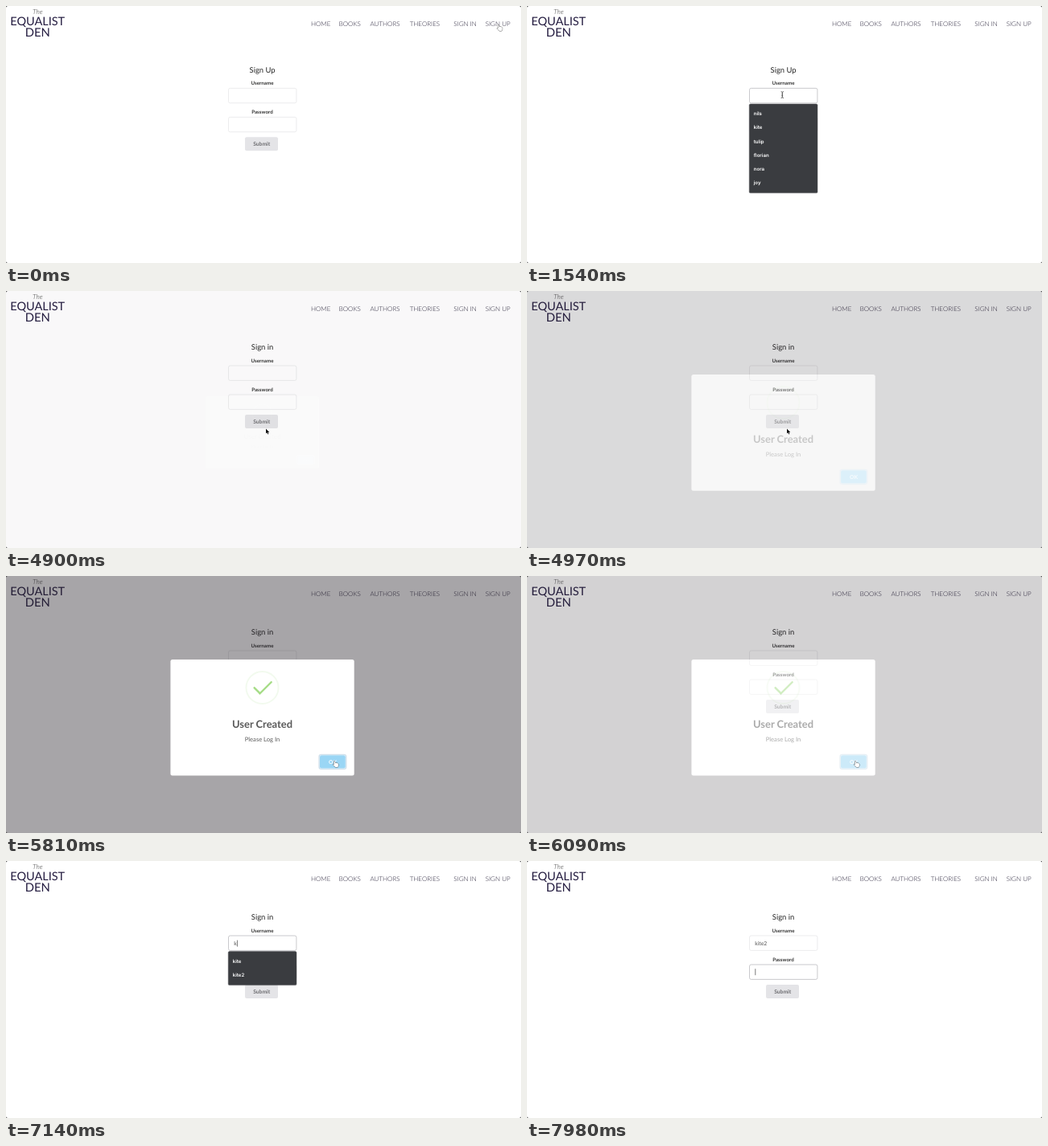
Recreate the animation shown at these times as an HTML page with a canvas. Size 640 px wide and 320 px high, loop 8000 ms.

```html
<!DOCTYPE html>
<html lang="en">
<head>
<meta charset="utf-8">
<title>Sign up demo</title>
<style>
  html, body { margin: 0; width: 100%; height: 100%; overflow: hidden; background: #fff; }
  canvas { display: block; width: 640px; height: 320px; }
</style>
</head>
<body>
<canvas id="stage"></canvas>
<script>
const W = 640, H = 320, LOOP = 8000, STEP = 70;
const ratio = window.devicePixelRatio || 1;

function prepare(canvas) {
  canvas.width = W * ratio;
  canvas.height = H * ratio;
  const c = canvas.getContext('2d');
  c.scale(ratio, ratio);
  c.textRendering = 'geometricPrecision';
  return c;
}
const screen = prepare(document.getElementById('stage'));
const layerCanvas = document.createElement('canvas');
const layer = prepare(layerCanvas);

// Value of the last entry whose time has come.
function at(t, keys) {
  let value = keys[0][1];
  for (const [time, v] of keys) if (t >= time) value = v;
  return value;
}

// Eased values between [time, ...values] keys.
function track(t, keys) {
  if (t <= keys[0][0]) return keys[0].slice(1);
  for (let i = 1; i < keys.length; i++) {
    const a = keys[i - 1], b = keys[i];
    if (t > b[0]) continue;
    const p = (t - a[0]) / (b[0] - a[0]), e = p * p * (3 - 2 * p);
    return a.slice(1).map((v, k) => v + (b[k + 1] - v) * e);
  }
  return keys[keys.length - 1].slice(1);
}

function text(c, str, x, y, font, color, align = 'left') {
  c.font = font + ', sans-serif';
  c.fillStyle = color;
  c.textAlign = align;
  c.fillText(str, x, y);
}

function box(c, x, y, w, h, r, fill, stroke, width = 0.7) {
  c.beginPath();
  c.roundRect(x, y, w, h, r);
  if (fill) { c.fillStyle = fill; c.fill(); }
  if (stroke) { c.strokeStyle = stroke; c.lineWidth = width; c.stroke(); }
}

// ---- page ----
const MID = 318.5;
const NAV = [['HOME', 379], ['BOOKS', 413.7], ['AUTHORS', 452.5], ['THEORIES', 501.7],
  ['SIGN IN', 556.3], ['SIGN UP', 595.7]];
const MENU = ['nils', 'kite', 'tulip', 'florian', 'nora', 'joy'];
const MATCHES = ['kite', 'kite2'];

const USER = [[0, ''], [1680, 'k'], [1820, 'ki'], [1890, 'kit'], [1960, 'kite'], [2240, 'kite2'],
  [4900, ''], [7140, 'k'], [7280, 'ki'], [7420, 'kit'], [7560, 'kite'], [7700, 'kite2']];
const DOTS = [[0, 0], [3010, 1], [3290, 2], [3360, 3], [3500, 4], [3850, 5], [4900, 0]];
const FOCUS = [[0, ''], [1260, 'user'], [2800, 'pass'], [4550, ''], [6860, 'user'], [7910, 'pass']];
const CARET = [[0, true], [1540, false], [1680, true], [2590, false], [2800, true]];
const ROWS = [[0, 0], [1260, 6], [1680, 1], [1960, 0], [6860, 6], [7140, 2], [7700, 0]];

function drawHeader(c) {
  text(c, 'The', 39.3, 10.3, 'italic 300 8.3px Lato', '#333', 'center');
  text(c, 'EQUALIST', 39.2, 23.7, '400 14.5px Lato', '#241c40', 'center');
  text(c, 'DEN', 39.2, 37.8, '400 14.8px Lato', '#241c40', 'center');
  for (const [label, x] of NAV) text(c, label, x, 25, '300 8px Lato', '#221c34');
}

function drawCaret(c, x, y) {
  c.fillStyle = '#444';
  c.fillRect(x, y - 4, 0.7, 8);
}

function drawField(c, y, focused) {
  box(c, 276.5, y, 84.4, 18.4, 2, '#fff', focused ? '#b4b4b8' : '#e4e4e6');
}

function drawMenu(c, rows) {
  const names = rows === MENU.length ? MENU : MATCHES.slice(0, rows);
  box(c, 276.2, 122, 84.8, rows * 17.2 + 7.6, 1.5, '#3a3c40', '#55575b', 0.5);
  names.forEach((name, i) => text(c, name, 281.7, 136.2 + i * 17.2, '600 6.1px Inter', '#fff'));
}

function drawForm(c, t) {
  const signIn = t >= 4900, focus = at(t, FOCUS), blink = at(t, CARET);
  const user = at(t, USER), dots = at(t, DOTS), rows = at(t, ROWS);
  const hover = t >= 4340 && t < 4900;
  c.save();
  if (signIn) c.translate(0, -9.4);
  text(c, signIn ? 'Sign in' : 'Sign Up', MID, 82.5, '400 9.4px Lato', '#222', 'center');
  text(c, 'Username', MID, 98.2, '700 6.2px Lato', '#333', 'center');
  text(c, 'Password', MID, 134, '700 6.2px Lato', '#333', 'center');

  drawField(c, 102.4, focus === 'user');
  text(c, user, 283.2, 114.3, '400 6.8px Lato', '#505050');
  if (focus === 'user' && blink) drawCaret(c, 283.5 + c.measureText(user).width, 112);

  drawField(c, 138.4, focus === 'pass');
  c.fillStyle = '#222';
  for (let i = 0; i < dots; i++) {
    c.beginPath();
    c.arc(285.2 + i * 3.9, 148, 1.45, 0, 7);
    c.fill();
  }
  if (focus === 'pass') drawCaret(c, 283.5 + dots * 3.9, 147.6);

  box(c, 297, 163.3, 41, 17, 2, hover ? '#cfcfd2' : '#e4e4e7');
  text(c, 'Submit', 317.7, 174, '700 6.7px Lato', '#6c6c70', 'center');
  if (rows) drawMenu(c, rows);
  c.restore();
}

// ---- alert ----
const UNIT = 0.477;
const POP = 4860;
const FADE = [[POP, 0], [5110, 1], [6020, 1], [6160, 0]];
const SCALE = [[0, 0.5], [135, 1.05], [240, 0.95], [300, 1]];
// width, centre x, centre y of both strokes of the tick, in an 80 unit icon
const TIP = [[405, 0, 1, 21.5], [525, 50, 17, 39.5], [630, 17, 29.5, 50.5], [750, 25, 26.5, 47.5]];
const LONG = [[488, 0, 34, 56.5], [630, 55, 52.5, 37.5], [750, 47, 48.5, 40.5]];

function drawStroke(c, [w, x, y], angle) {
  if (w <= 0) return;
  c.save();
  c.translate(x - 40, y - 40);
  c.rotate(angle);
  box(c, -w / 2, -2.5, w, 5, 2, '#a5dc86');
  c.restore();
}

function drawTick(c, age) {
  c.save();
  c.translate(MID, 139);
  c.scale(UNIT, UNIT);
  c.beginPath();
  c.arc(0, 0, 42, 0, 7);
  c.lineWidth = 4;
  c.strokeStyle = 'rgba(165,220,134,.14)';
  c.stroke();
  drawStroke(c, track(age, TIP), Math.PI / 4);
  drawStroke(c, track(age, LONG), -Math.PI / 4);
  c.restore();
}

function drawAlert(t) {
  const [fade] = track(t, FADE);
  if (t < 4900 || fade <= 0) return;
  const c = layer, age = t - POP, [scale] = track(age, SCALE);
  c.clearRect(0, 0, W, H);
  c.fillStyle = 'rgba(35,30,38,.4)';
  c.fillRect(0, 0, W, H);
  c.save();
  c.globalAlpha = Math.min(1, age / 140);
  c.translate(MID, 176.3);
  c.scale(scale, scale);
  c.translate(-MID, -176.3);
  box(c, 204.4, 104, 228.3, 144.6, 2.5, '#fff');
  drawTick(c, age);
  text(c, 'User Created', MID, 189.4, '700 12.9px Lato', '#595959', 'center');
  text(c, 'Please Log In', MID, 206.3, '400 7.6px Lato', '#5c5c5c', 'center');
  box(c, 389.1, 222.4, 33.6, 18, 2.6, null, '#cfe0ec', 1.4);
  box(c, 390, 223.3, 31.8, 16.2, 2, '#9ad6f5');
  text(c, 'OK', 406, 234, '700 6.7px Lato', '#fff', 'center');
  c.restore();
  screen.globalAlpha = fade;
  screen.drawImage(layerCanvas, 0, 0, W, H);
  screen.globalAlpha = 1;
}

// ---- pointer ----
const PATH = [[0, 611, 23], [70, 611, 23], [140, 500, 44], [210, 386, 50], [280, 386, 50],
  [910, 317.3, 110.6], [1680, 317.3, 110.6], [4060, 319, 135], [4550, 323, 171.5],
  [4970, 323, 171.5], [5600, 407.3, 230], [6300, 407.3, 230], [6650, 341.3, 100]];
const KIND = [[0, 'hand'], [140, 'arrow'], [840, 'beam'], [1680, ''], [4130, 'beam'], [4340, 'hand'],
  [4900, 'arrow'], [5460, 'hand'], [6370, 'arrow'], [6580, 'beam'], [7140, '']];

const SHAPES = {
  arrow: { path: new Path2D('M0 0V6L1.4 4.8L2.4 7L3.4 6.6L2.5 4.4H4.3Z'), fill: '#111', line: '#fff' },
  hand: { path: new Path2D('M0 .8Q.5 -.2 1.1 .7L1.9 3L3.2 2.7L4.3 3L5.4 3.6L5.8 5.4L5.1 8H2.2L-.9 5.2Q-.9 4.1 .3 4.5L.9 4.7Z'),
    fill: '#fff', line: '#444' },
  beam: { path: new Path2D('M-1.7 -4Q0 -4 0 -3V3Q0 4 -1.7 4M1.7 -4Q0 -4 0 -3V3Q0 4 1.7 4M-.8 .8H.8'), line: '#555' }
};

function drawPointer(c, t) {
  const shape = SHAPES[at(t, KIND)];
  if (!shape) return;
  const [x, y] = track(t, PATH);
  c.save();
  c.translate(x, y);
  c.lineWidth = 0.8;
  c.strokeStyle = shape.line;
  c.stroke(shape.path);
  if (shape.fill) { c.fillStyle = shape.fill; c.fill(shape.path); }
  c.restore();
}

// Dark slivers outside the rounded window corners.
function drawCorners(c) {
  c.beginPath();
  c.rect(0, 0, W, H);
  c.roundRect(0, 0, W, H, 2.5);
  c.fillStyle = '#444';
  c.fill('evenodd');
}

function draw(now) {
  const t = Math.floor((now % LOOP) / STEP) * STEP;
  screen.fillStyle = '#fff';
  screen.fillRect(0, 0, W, H);
  drawHeader(screen);
  drawForm(screen, t);
  drawAlert(t);
  drawPointer(screen, t);
  drawCorners(screen);
}

let start;
function tick(now) {
  start ??= now;
  draw(Math.max(0, now - start));
  requestAnimationFrame(tick);
}
draw(0);
requestAnimationFrame(tick);
</script>
</body>
</html>
```
